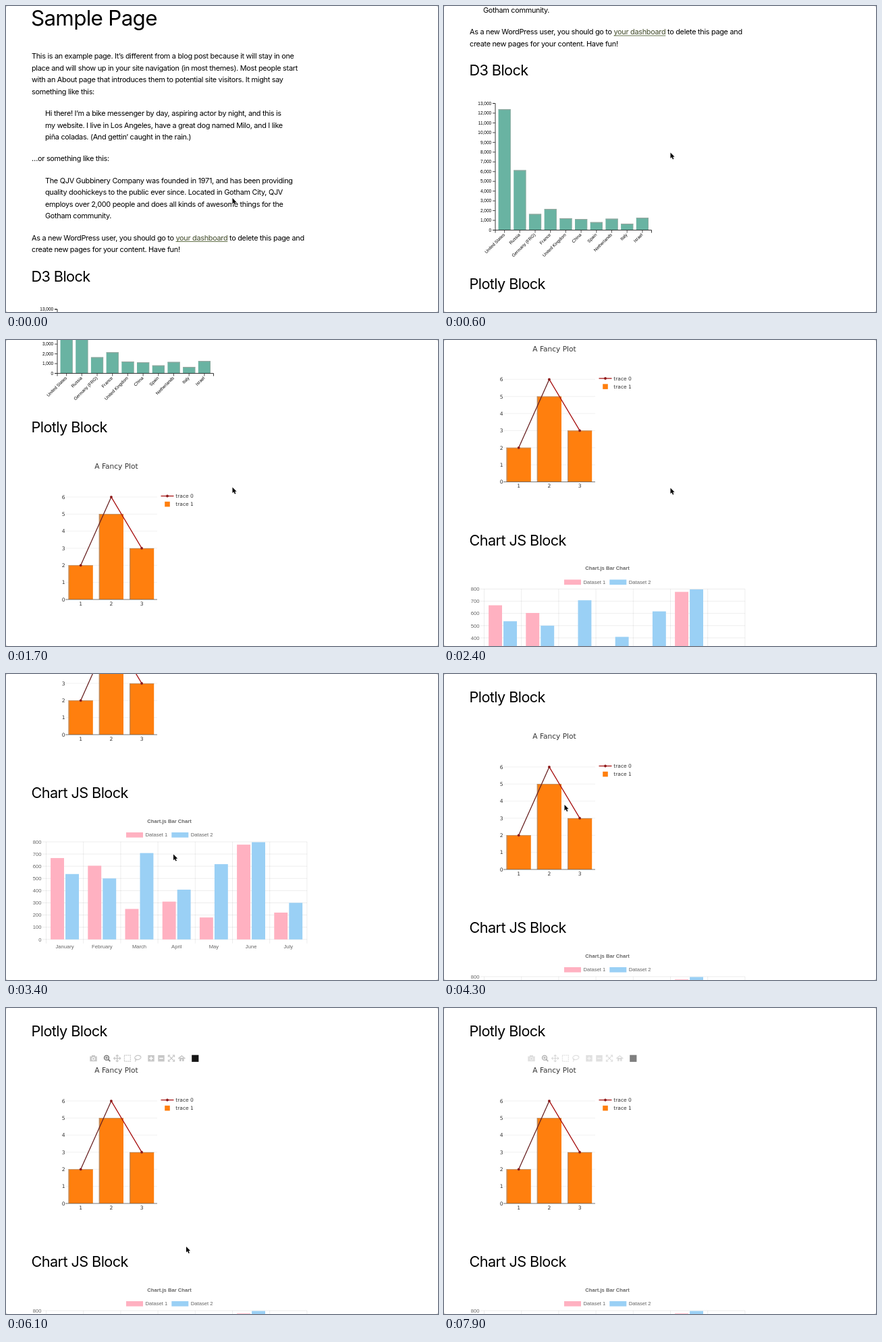
Write an HTML page with a canvas that moves like this. It is 640x454 px and loops after 8000 ms.

```html
<!DOCTYPE html>
<html lang="en">
<head>
<meta charset="utf-8">
<title>Sample Page</title>
<style>
html, body { margin: 0; width: 100%; height: 100%; overflow: hidden; background: #fff; }
canvas { display: block; width: 640px; height: 454px; }
</style>
</head>
<body>
<canvas id="stage"></canvas>
<script>
const W = 640, H = 454, LOOP = 8000, STEP = 100;
const canvas = document.getElementById('stage');
const ctx = canvas.getContext('2d');
const dpr = window.devicePixelRatio || 1;
canvas.width = W * dpr;
canvas.height = H * dpr;

const BODY = '10.9px Inter, "Open Sans", sans-serif';
const H1 = '31.4px Inter, "Open Sans", sans-serif';
const H2 = '21.7px Inter, "Open Sans", sans-serif';
const arial = (size, weight = '') => `${weight} ${size}px "Liberation Sans", Arial, sans-serif`;
const dejavu = size => `${size}px "DejaVu Sans", Verdana, sans-serif`;

// [time, value...] points, linear in between
const SCROLL = [[0, 0], [100, 14], [200, 70], [400, 230], [500, 284], [600, 305.5], [900, 305.5],
  [1100, 335], [1400, 455], [1700, 588.5], [1800, 686], [1900, 728], [2100, 757], [2400, 763],
  [2700, 883.5], [3600, 883.5], [3700, 866], [4000, 735], [4200, 685], [4300, 683.5], [8000, 683.5]];
const POINTER = [[0, 335.5, 285], [600, 335.5, 217.5], [1700, 335.5, 218.5], [2400, 335.5, 219.5],
  [2700, 335.5, 220], [3100, 318, 300], [3600, 210, 250], [4200, 178.5, 194], [4500, 178.5, 194],
  [4900, 160, 62], [5400, 200, 200], [5800, 262, 424], [6100, 267, 354], [6700, 200, 200],
  [7200, 212, 230], [7700, 322, 470], [8000, 322, 470]];
const MODEBAR = [[0, 0], [4400, 0], [4700, 1], [7800, 1], [8000, 0.1]];

function at(track, t, ease = u => u) {
  const i = Math.max(1, track.findIndex(p => p[0] >= t));
  const a = track[i - 1], b = track[i];
  const u = ease((t - a[0]) / (b[0] - a[0]));
  return a.slice(1).map((v, k) => v + (b[k + 1] - v) * u);
}
const smooth = u => u * u * (3 - 2 * u);

function text(str, x, y, font, color = '#000', align = 'left', spacing = 0) {
  ctx.font = font;
  ctx.fillStyle = color;
  ctx.textAlign = align;
  ctx.letterSpacing = spacing + 'px';
  ctx.fillText(str, x, y);
  return ctx.measureText(str).width;
}
function rect(x, y, w, h, color) {
  ctx.fillStyle = color;
  ctx.fillRect(x, y, w, h);
}
function path(points, color, width = 1) {
  ctx.beginPath();
  points.forEach(([x, y], i) => i ? ctx.lineTo(x, y) : ctx.moveTo(x, y));
  ctx.strokeStyle = color;
  ctx.lineWidth = width;
  ctx.stroke();
}
function dot(x, y, r, color) {
  ctx.beginPath();
  ctx.arc(x, y, r, 0, Math.PI * 2);
  ctx.fillStyle = color;
  ctx.fill();
}
const body = (str, x, y, color) => text(str, x, y, BODY, color, 'left', -0.3);
const lines = (x, y, list) => list.forEach((s, i) => body(s, x, y + i * 17.5));
const heading = (str, y) => text(str, 37.5, y, H2, '#000', 'left', -0.6);

function article() {
  text('Sample Page', 37, 29, H1, '#000', 'left', -0.7);
  lines(38, 78, [
    'This is an example page. It’s different from a blog post because it will stay in one',
    'place and will show up in your site navigation (in most themes). Most people start',
    'with an About page that introduces them to potential site visitors. It might say',
    'something like this:']);
  lines(58, 163, [
    'Hi there! I’m a bike messenger by day, aspiring actor by night, and this is',
    'my website. I live in Los Angeles, have a great dog named Milo, and I like',
    'piña coladas. (And gettin’ caught in the rain.)']);
  body('…or something like this:', 38, 230);
  lines(58, 262.5, [
    'The QJV Gubbinery Company was founded in 1971, and has been providing',
    'quality doohickeys to the public ever since. Located in Gotham City, QJV',
    'employs over 2,000 people and does all kinds of awesome things for the',
    'Gotham community.']);
  let x = 38;
  x += body('As a new WordPress user, you should go to ', x, 347.5);
  const w = body('your dashboard', x, 347.5, '#404a2a');
  rect(x, 349, w, 1, '#65734a');
  body(' to delete this page and', x + w, 347.5);
  body('create new pages for your content. Have fun!', 38, 365);
}

const SALES = [['United States', 12394], ['Russia', 6148], ['Germany (FRG)', 1653], ['France', 2162],
  ['United Kingdom', 1214], ['China', 1131], ['Spain', 814], ['Netherlands', 1167], ['Italy', 660], ['Israel', 1263]];

function d3Chart() {
  heading('D3 Block', 408.7);
  const left = 76, right = 307.5, base = 638, unit = 188 / 13000;
  const band = (right - left) / 10.2;
  SALES.forEach(([name, value], i) => {
    const x = left + band * (i + 0.2), w = band * 0.8, h = value * unit;
    rect(x, base - h, w, h, '#69b3a2');
    rect(x, base - h, w, 1, '#98a39c');
    rect(x + w - 0.6, base - h, 0.6, h, '#98a39c');
    const mid = x + w / 2;
    path([[mid, base], [mid, base + 4]], '#222', 0.8);
    ctx.save();
    ctx.translate(mid + 0.9, base + 7.4);
    ctx.rotate(-Math.PI / 4);
    text(name, 0, 0, arial(6.5), '#000', 'right');
    ctx.restore();
  });
  path([[left - 4, base - 188], [left, base - 188], [left, base], [left - 4, base]], '#222', 0.9);
  path([[left, base + 4], [left, base], [right, base], [right, base + 4]], '#222', 0.9);
  for (let v = 0; v <= 13000; v += 1000) {
    const y = base - v * unit;
    path([[left - 4, y], [left, y]], '#222', 0.8);
    text(v.toLocaleString('en-US'), left - 5.8, y + 2.2, arial(6.5), '#000', 'right');
  }
}

function plotlyChart() {
  heading('Plotly Block', 725.7);
  const base = 973.5, unit = 25.35, ink = '#333';
  const px = i => 110.7 + 45.2 * i, py = v => base - v * unit;
  text('A Fancy Plot', 163.5, 779.5, dejavu(10.6), ink, 'center');
  for (let v = 0; v <= 6; v++) {
    if (v) path([[89, py(v)], [224, py(v)]], '#eee', 0.8);
    text(v, 87.5, py(v) + 2.8, dejavu(7.6), ink, 'right');
  }
  [2, 5, 3].forEach((v, i) => {
    const x = px(i) - 18.1;
    rect(x, py(v), 36.2, v * unit, '#ff7f0e');
    rect(x, py(v), 1.2, v * unit, '#b58c68');
    rect(x, py(v), 36.2, 0.8, '#b58c68');
    text(i + 1, px(i), base + 8.8, dejavu(7.6), ink, 'center');
  });
  path([[88, base], [224, base]], '#555', 0.8);
  const pts = [2, 6, 3].map((v, i) => [px(i), py(v)]);
  path(pts.slice(0, 2), '#6a2424', 1.3);
  path(pts.slice(1), '#a81212', 1.3);
  pts.forEach(([x, y]) => dot(x, y, 1.9, '#8c1a1a'));
  path([[229.5, 820], [248.5, 820]], '#a81212', 1.3);
  dot(239, 820, 1.9, '#8c1a1a');
  rect(235.2, 828.3, 7.6, 7.6, '#ff7f0e');
  text('trace 0', 251.3, 822.8, dejavu(7.5), ink);
  text('trace 1', 251.3, 834.8, dejavu(7.5), ink);
}

const MONTHS = ['January', 'February', 'March', 'April', 'May', 'June', 'July'];
const SETS = [
  { color: '#ffb1c1', data: [667, 604, 250, 310, 180, 777, 220] },
  { color: '#9ad0f5', data: [536, 500, 708, 408, 617, 797, 300] }];

function chartJs() {
  heading('Chart JS Block', 1067.7);
  const left = 59.5, col = 55.2, top = 1132.5, unit = 0.181, base = top + 800 * unit;
  const ink = '#666', rule = 'rgba(0,0,0,.1)';
  text('Chart.js Bar Chart', 242, 1104.2, arial(7.65, 'bold'), ink, 'center');
  SETS.forEach(({ color }, i) => {
    const x = 178 + i * 67.3;
    rect(x, 1118.5, 25, 7.6, color);
    text('Dataset ' + (i + 1), x + 28.5, 1124.9, arial(7.65), ink);
  });
  for (let v = 0; v <= 800; v += 100) {
    const y = base - v * unit;
    path([[53.5, y], [left + 7 * col, y]], rule, 0.7);
    text(v, 52.5, y + 2.7, arial(7.65), ink, 'right');
  }
  for (let i = 0; i <= 7; i++) path([[left + i * col, top], [left + i * col, base + 6]], rule, 0.7);
  SETS.forEach(({ color, data }, s) => data.forEach((v, i) => {
    rect(left + i * col + 6.6 + s * 22, base - v * unit, 19.9, v * unit, color);
  }));
  MONTHS.forEach((m, i) => text(m, left + (i + 0.5) * col, base + 13, arial(7.65), ink, 'center'));
}

function modebar(alpha) {
  if (!alpha) return;
  const y = 758.2, pale = '#c7c7c7', dark = '#7c7c7c';
  ctx.save();
  ctx.globalAlpha = alpha;
  // camera
  rect(124.3, y - 3, 10.4, 7.5, pale);
  rect(127, y - 4.6, 5, 2, pale);
  dot(129.5, y + 0.6, 2.5, '#fff');
  dot(129.5, y + 0.6, 1.4, pale);
  // zoom
  ctx.beginPath();
  ctx.arc(149, y - 0.8, 3.4, 0, Math.PI * 2);
  ctx.strokeStyle = dark;
  ctx.lineWidth = 1.6;
  ctx.stroke();
  path([[151.3, y + 1.5], [154.3, y + 4.5]], dark, 1.9);
  path([[147.2, y - 0.8], [150.8, y - 0.8]], dark, 1.1);
  path([[149, y - 2.6], [149, y + 1]], dark, 1.1);
  // pan
  path([[159.5, y], [170, y]], pale, 1.3);
  path([[164.7, y - 5.2], [164.7, y + 5.2]], pale, 1.3);
  for (let k = 0; k < 4; k++) {
    ctx.save();
    ctx.translate(164.7, y);
    ctx.rotate(k * Math.PI / 2);
    path([[-2, -3.2], [0, -5], [2, -3.2]], pale, 1.2);
    ctx.restore();
  }
  // box select
  ctx.setLineDash([1.8, 1]);
  ctx.lineWidth = 1.2;
  ctx.strokeRect(175.4, y - 4.5, 9, 9);
  ctx.setLineDash([]);
  // lasso
  ctx.beginPath();
  ctx.ellipse(195.3, y - 1.2, 4.6, 3.1, -0.15, 0, Math.PI * 2);
  ctx.lineWidth = 1.2;
  ctx.stroke();
  path([[191.8, y + 0.8], [192.4, y + 2.8], [191.2, y + 4.8]], pale, 1.2);
  // zoom in and out
  [215, 230].forEach((x, i) => {
    rect(x - 4.7, y - 4.7, 9.4, 9.4, pale);
    path([[x - 2.8, y], [x + 2.8, y]], '#fff', 1.6);
    if (!i) path([[x, y - 2.8], [x, y + 2.8]], '#fff', 1.6);
  });
  // autoscale
  path([[241, y - 4], [249, y + 4]], pale, 1.2);
  path([[249, y - 4], [241, y + 4]], pale, 1.2);
  for (const sx of [-1, 1]) for (const sy of [-1, 1]) {
    const x = 245 + sx * 4.6, cy = y + sy * 4.6;
    path([[x - sx * 2.8, cy], [x, cy], [x, cy - sy * 2.8]], pale, 1.1);
  }
  // home
  path([[255.2, y + 0.4], [260.3, y - 3.8], [265.4, y + 0.4]], pale, 1.4);
  rect(257, y, 2.6, 4.3, pale);
  rect(261, y, 2.6, 4.3, pale);
  rect(257, y - 0.8, 6.6, 2.2, pale);
  rect(275.2, y - 5, 10.2, 10.2, '#161616');
  ctx.restore();
}

function pointer(x, y) {
  ctx.beginPath();
  [[0, 0], [0, 8.6], [2, 6.8], [3.4, 10], [4.9, 9.4], [3.5, 6.3], [6.1, 6.2]]
    .forEach(([dx, dy]) => ctx.lineTo(x + dx, y + dy));
  ctx.closePath();
  ctx.lineJoin = 'round';
  ctx.strokeStyle = '#fff';
  ctx.lineWidth = 1.4;
  ctx.stroke();
  ctx.fillStyle = '#000';
  ctx.fill();
  ctx.lineJoin = 'miter';
}

function draw(t) {
  ctx.setTransform(dpr, 0, 0, dpr, 0, 0);
  rect(0, 0, W, H, '#ccc');
  ctx.beginPath();
  ctx.roundRect(0, 0, W, H, 3);
  ctx.fillStyle = '#fff';
  ctx.fill();
  ctx.save();
  ctx.translate(0, -at(SCROLL, t)[0]);
  article();
  d3Chart();
  plotlyChart();
  chartJs();
  modebar(at(MODEBAR, t)[0]);
  ctx.restore();
  pointer(...at(POINTER, t, smooth));
}

function frame() {
  const t = performance.now() % LOOP;
  draw(Math.floor(t / STEP) * STEP);
  requestAnimationFrame(frame);
}
frame();
</script>
</body>
</html>
```
